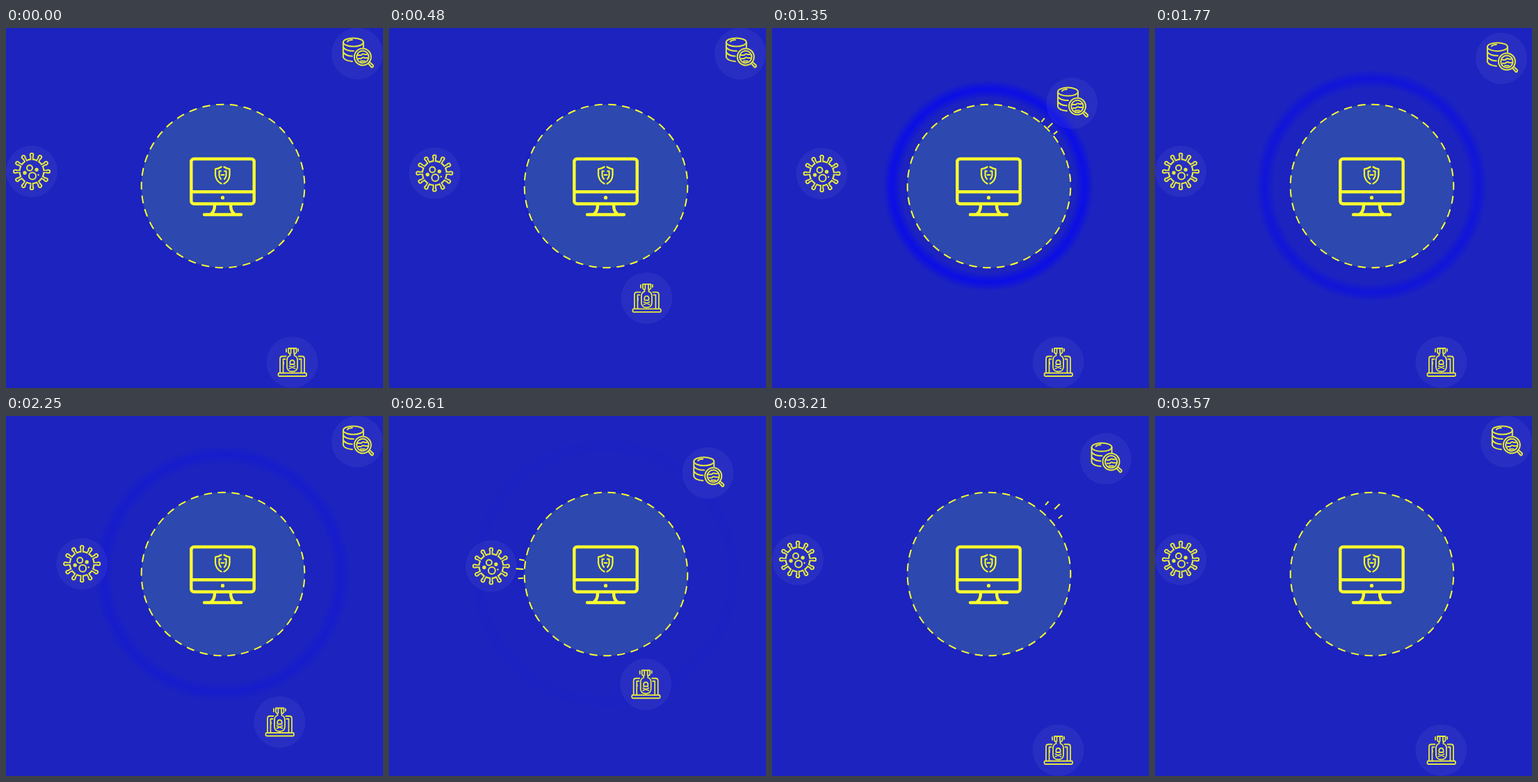
Write an HTML page that moves like this. It is 542 px wide and 517 px high and loops after 3.6 s.

```html
<!DOCTYPE html>
<html lang="en">
<head>
<meta charset="utf-8">
<title>Threats bouncing off a shield</title>
<style>
  html, body { margin: 0; width: 100%; height: 100%; overflow: hidden; background: #1c23bf; }
  svg { display: block; --ink: #faff2e; }
  .threat { --ink: #e4e83f; }
  .line { fill: none; stroke: var(--ink); stroke-linecap: round; stroke-linejoin: round; }
  .fill { fill: var(--ink); }
  .hole { fill: #272ec3; --ink: #272ec3; }
</style>
</head>
<body>
<svg width="542" height="517" viewBox="0 0 542 517">
  <defs>
    <radialGradient id="wave" gradientUnits="userSpaceOnUse" cx="311" cy="226.5" r="200">
      <stop stop-color="#00f" stop-opacity="0"/>
      <stop stop-color="#00f" stop-opacity=".55"/>
      <stop stop-color="#00f"/>
      <stop stop-color="#00f" stop-opacity=".55"/>
      <stop stop-color="#00f" stop-opacity="0"/>
    </radialGradient>
  </defs>
  <circle id="glow" cx="311" cy="226.5" r="200" fill="url(#wave)"/>

  <circle cx="312" cy="227" r="117.5" fill="#2d48af"/>
  <circle id="ring" class="line" cx="312" cy="227" r="117.3" stroke-width="2"
    style="stroke-linecap:butt" pathLength="37" stroke-dasharray=".57 .43"/>

  <g class="line" stroke-width="4.4">
    <rect x="266.3" y="188" width="90.4" height="64.5" rx="4"/>
    <path d="M267 235.3H356M300 254Q300 263 295 267M323 254Q323 263 328 267M285 268H338"/>
  </g>
  <circle class="fill" cx="311.5" cy="243.7" r="2.6"/>
  <g class="line" stroke-width="2.2">
    <path d="M309.5 199.5Q306 202 301 202.5V211Q302 220 309.5 223.5M313.5 199.5Q317 202 321.5 202.5V211Q321 220 313.5 223.5"/>
    <path d="M309 205.5H306.5V212Q307 215 309 217M314 205.5H316.5V212Q316 215 314 217M309.5 211H313.5" stroke-width="2"/>
  </g>

  <g id="virus" class="threat">
    <circle r="37" fill="#fff" fill-opacity=".05"/>
    <g id="spikes"></g>
    <g class="line" stroke-width="2">
      <circle cx="-3" cy="-5" r="4"/><circle cx="1" cy="6.5" r="5"/>
    </g>
    <circle class="fill" cx="7" cy="-2.5" r="2.7"/>
    <circle class="fill" cx="-10" cy="2" r="2.7"/>
    <circle class="fill" cx="9.500" cy="5" r="1.2"/>
  </g>

  <g id="data" class="threat">
    <circle r="37" fill="#fff" fill-opacity=".05"/>
    <g transform="translate(-1.2 0)">
      <g class="line" stroke-width="2">
        <ellipse cx="-4.5" cy="-16.5" rx="14.5" ry="6"/>
        <path d="M-19-16.5V5Q-17 10-6 11M10-16.5V-8M-19-9.5Q-16-4-4-4M-19-2.5Q-16 3-6 3.5M-13-17.5Q-11-20-6-20"/>
      </g>
      <circle class="hole" cx="9" cy="4.5" r="13"/>
      <g class="line" stroke-width="2">
        <circle cx="9" cy="4.5" r="12"/><circle cx="9" cy="4.5" r="8.7"/>
        <path d="M17.5 14.5L22 19.5Q24.5 19.5 24 16.5L19.500 12.5M2 2H7Q9-1 12 1H15M3 7H7Q9 4 12 6H16M6 10.5H12"/>
      </g>
    </g>
  </g>

  <g id="bomb" class="threat">
    <circle r="37" fill="#fff" fill-opacity=".05"/>
    <g class="line" stroke-width="1.8">
      <rect x="-20" y="15.5" width="40.5" height="4.5" rx="1.5"/>
      <path d="M-9-8.5H-14Q-17.5-8.5-17.5-5V15M-10-4.5H-13V15M9-8.5H14Q17.5-8.5 17.5-5V15M10-4.5H13V15M-12.5 0V3M-8.5-19V-15M8.5-19V-16"/>
      <path d="M-5.5-20H6V-14L3-11.5V-9.5Q7.5-8 7.5-3V7Q7 13.5 0 13.5T-7.5 7V-3Q-7.5-8-3-9.5V-11.5L-5.5-14ZM-2-20V-13M2.5-20V-13"/>
      <path d="M-3 3Q-4-3 0-3T3 3ZM-4 9L4 5.5M-4 5.5L4 9"/>
    </g>
  </g>

  <path id="sparks" class="line" stroke-width="2" style="stroke-linecap:butt"/>
</svg>
<script>
const LOOP = 3600, CX = 312, CY = 227, DASH = 360 / 37;
const $ = id => document.getElementById(id);
const clamp = v => Math.min(1, Math.max(0, v));
const ease = p => (1 - Math.cos(Math.PI * clamp(p))) / 2;

// Each trip: [leave, hit, bounce, home, spark start] in ms
const threats = [
  { id: 'virus', x: 37, y: 206, dx: 115, dy: 10, angle: 183.4, spread: 6.2,
    trips: [[274, 899, 901, 1615, 925], [1887, 2512, 2514, 3228, 2540]] },
  { id: 'data', x: 505, y: 37, dx: -79, dy: 76, angle: -44.7, spread: 6,
    trips: [[578, 1230, 1244, 1896, 1290], [2260, 2890, 2890, 3410, 2930]] },
  { id: 'bomb', x: 411.5, y: 480, dx: -43.2, dy: -96.7, angle: 73, spread: 8.2,
    trips: [[0, 560, 610, 1250, 618], [2000, 2560, 2560, 3120, 2670]] }
];

function spikeLayer(cls, width, tip, radius) {
  let out = `<circle r="${radius}"/>`;
  for (let i = 0; i < 12; i++) {
    out += `<g transform="rotate(${i * 30})">
      <path class="line" d="M0-15V-24" stroke-width="${width}"/>
      <circle cy="-23.7" r="${tip}"/></g>`;
  }
  return `<g class="${cls}">${out}</g>`;
}
$('spikes').innerHTML = spikeLayer('fill', 5.2, 3.3, 18.5) + spikeLayer('hole', 1.4, 1.3, 16.3);

function sparkLines({ angle, spread }, p) {
  if (p <= 0 || p >= 1) return '';
  return [-1, 0, 1].map(side => {
    const a = (angle + side * spread) * Math.PI / 180;
    const end = side ? 135 : 143;
    const at = r => `${CX + r * Math.cos(a)} ${CY + r * Math.sin(a)}`;
    const head = 121 + (end - 121) * clamp(p * 2);
    const tail = 119 + (end - 119) * clamp(p * 2 - 1);
    return `M${at(tail)}L${at(head)}`;
  }).join('');
}

function drawGlow(t) {
  const r = 107 + (t - 480) * .036;
  $('glow').setAttribute('opacity', t < 420 ? 0 : clamp(1 - (t - 480) / 2220));
  [...$('wave').children].forEach((stop, i) =>
    stop.setAttribute('offset', clamp((r + (i - 2) * 6.5) / 200)));
}

function draw(t) {
  drawGlow(t);
  $('ring').setAttribute('transform', `rotate(${2.4 + 5 * DASH * t / LOOP} ${CX} ${CY})`);
  let sparks = '';
  for (const threat of threats) {
    let k = 0;
    for (const [leave, hit, bounce, home, spark] of threat.trips) {
      k += ease((t - leave) / (hit - leave)) - ease((t - bounce) / (home - bounce));
      sparks += sparkLines(threat, (t - spark) / 360);
    }
    const x = threat.x + threat.dx * k, y = threat.y + threat.dy * k;
    $(threat.id).setAttribute('transform', `translate(${x} ${y})`);
  }
  $('sparks').setAttribute('d', sparks);
}

const start = performance.now();
function tick() {
  draw((performance.now() - start) % LOOP);
  requestAnimationFrame(tick);
}
tick();
</script>
</body>
</html>
```
